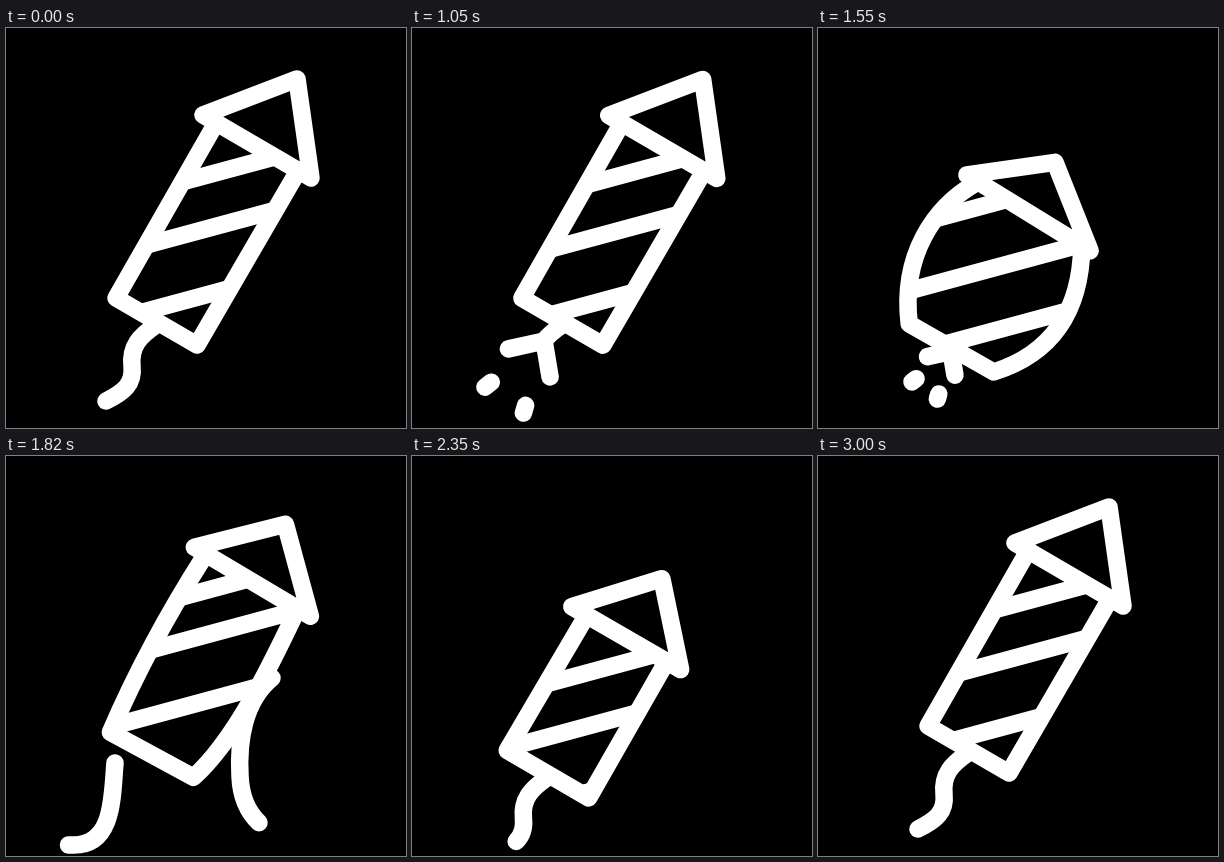
Write an HTML page that moves like this. It is 400 px wide and 400 px high and loops after 3020 ms.

```html
<!DOCTYPE html>
<html lang="en">
<head>
<meta charset="utf-8">
<title>Firework rocket</title>
<style>
  html, body { margin: 0; width: 100%; height: 100%; overflow: hidden; background: #000; }
  svg { display: block; width: 100vw; height: 100vh; }
  path { fill: none; stroke: #fff; stroke-width: 17.5; stroke-linecap: round; stroke-linejoin: round; }
  clipPath path { stroke: none; fill: #000; }
</style>
</head>
<body>
<svg viewBox="0 0 400 400">
  <defs><clipPath id="inside"><path id="hull"/></clipPath></defs>
  <path id="smokeL" pathLength="1" d="M109 307C106 340 108 389 68 389C30 390 5 365 12 335C20 300 75 300 85 335C90 360 78 368 64 368C30 370 33 338 55 338"/>
  <path id="smokeR" pathLength="1" d="M266 222C238 245 232 285 234 320C235 345 244 360 258 371C290 395 360 395 380 355C400 310 365 275 325 285C290 295 285 345 313 355C350 362 362 320 333 316"/>
  <path id="sparks"/>
  <g id="rocket">
    <path id="fuse" pathLength="1" d="M150 297C134 308 124 318 126 338C128 356 118 364 100 373"/>
    <g clip-path="url(#inside)"><path id="stripes"/></g>
    <path id="body"/>
    <path id="head"/>
  </g>
</svg>
<script>
const LOOP = 3020;
const $ = id => document.getElementById(id);
const clamp = x => Math.min(1, Math.max(0, x));
const span = (t, a, b) => clamp((t - a) / (b - a));
const inOut = (x, n) => x < .5 ? (2 * x) ** n / 2 : 1 - (2 - 2 * x) ** n / 2;
const mix = (a, b, k) => a.map((v, i) => v + (b[i] - v) * k);

// shape: nose triangle (3 points), then left top, left bottom, right bottom, right top.
// bend: control points of the left side (downward) and right side (upward).
function pose(shape, stripes, bend) {
  if (!bend) {
    const [lt, lb, rb, rt] = [6, 8, 10, 12].map(i => shape.slice(i, i + 2));
    bend = [...mix(lt, lb, 1 / 3), ...mix(lt, lb, 2 / 3), ...mix(rb, rt, 1 / 3), ...mix(rb, rt, 2 / 3)];
  }
  return { shape: [...shape, ...bend], stripes };
}
const blend = (p, q, k, ks = k) => ({
  shape: mix(p.shape, q.shape, k),
  stripes: mix(p.stripes, q.stripes, ks)
});

// Stripe values are heights at x = 200.
const rest = pose([197, 87, 291, 51, 305, 150, 210, 95, 110, 270, 191, 317, 292, 143], [147.5, 201, 267]);
const squat = pose([156, 138, 245, 122, 277, 212, 166, 146, 94, 292, 178, 340, 268, 207], [165, 228, 291.5],
  [125, 175, 92, 225, 235, 315, 262, 268]);
const launch = pose([188, 92, 279, 69, 304, 161, 198, 101, 104, 277, 187, 322, 290, 156], [135, 179.5, 245.5],
  [170, 145, 135, 205, 228, 285, 262, 215]);
const rise = pose([119, 220, 205, 201, 229, 283, 134, 233, 79, 321, 161, 369, 213, 275], [278.5, 332, 398]);

const TURN = 1975; // rocket is out of sight here and comes back from below

function rocketAt(t) {
  if (t < TURN) {
    const k = 1.174 * inOut(span(t, 1000, 1450), 3);
    const ks = 1.2 * inOut(span(t, 930, 1450), 2);
    const s = Math.max(0, t - 1820);
    const p = blend(blend(rest, squat, k, ks), launch, span(t, 1560, 1820) ** 3);
    return { p, lift: .8 * s + .018 * s * s };
  }
  const k = Math.min(1.3, (Math.max(0, 3000 - t) / 830) ** 3);
  return { p: blend(rest, rise, k), lift: -300 * (Math.max(0, 2150 - t) / 175) ** 2, k };
}

function trim(el, from, to) {
  const len = to - from;
  el.style.display = len > .002 ? '' : 'none';
  el.setAttribute('stroke-dasharray', `0 ${from} ${len} 2`);
}

function drawRocket(t, p, lift) {
  const [ax, ay, bx, by, cx, cy, ltx, lty, lbx, lby, rbx, rby, rtx, rty, ...bend] = p.shape;
  const side = `M${ltx} ${lty}C${bend.slice(0, 4)} ${lbx} ${lby}L${rbx} ${rby}C${bend.slice(4)} ${rtx} ${rty}`;
  $('head').setAttribute('d', `M${ax} ${ay}L${bx} ${by}L${cx} ${cy}Z`);
  $('body').setAttribute('d', side);
  $('hull').setAttribute('d', side + 'Z');
  $('stripes').setAttribute('d', p.stripes.map(y => `M0 ${y + 54}L400 ${y - 54}`).join(''));
  $('rocket').setAttribute('transform', `translate(${lift * .5} ${-lift * .866})`);
  const shift = [(lbx + rbx) / 2 - 150.5, (lby + rby) / 2 - 293.5];
  $('fuse').setAttribute('transform', `translate(${shift})`);
  return shift;
}

function drawSparks(t, x, y) {
  const size = span(t, 520, 700) * (1 - span(t, 1500, 1650));
  $('sparks').style.display = size > 0 ? '' : 'none';
  if (!size) return;
  const c = Math.cos((t - 1050) / 250 * Math.PI);
  const mid = 121 + 3 * c;
  const at = (deg, r) => {
    const a = deg * Math.PI / 180;
    return `${x + Math.cos(a) * r * size} ${y + Math.sin(a) * r * size}`;
  };
  let d = '';
  for (const s of [-1, 1]) {
    const ray = mid + s * (29 + 14.5 * c);
    const dot = mid + s * (28.5 - 10.5 * c);
    const r = 68 + 3 * c;
    d += `M${x} ${y}L${at(ray, 46.5 - 10 * c)}M${at(dot, r - 4)}L${at(dot, r + 4)}`;
  }
  $('sparks').setAttribute('d', d);
}

function drawSmoke(t) {
  const head = t < 1820 ? .27 * span(t, 1690, 1820) : 1 - .73 * (1 - span(t, 1820, 2170)) ** 1.6;
  const tail = t < 2170 ? .87 * inOut(span(t, 1820, 2170), 1.5) : .87 + .13 * span(t, 2170, 2290);
  trim($('smokeL'), tail, head);
  trim($('smokeR'), tail, head);
}

function draw(now) {
  const t = now % LOOP;
  const { p, lift, k } = rocketAt(t);
  const [dx, dy] = drawRocket(t, p, lift);
  const fuse = k === undefined ? 1 - span(t, 530, 1220) : Math.max(.3, 1 - .48 * k);
  trim($('fuse'), 0, fuse);
  const tip = $('fuse').getPointAtLength($('fuse').getTotalLength() * fuse);
  drawSparks(t, tip.x + dx, tip.y + dy);
  drawSmoke(t);
}

const start = performance.now();
function tick() {
  draw(performance.now() - start);
  requestAnimationFrame(tick);
}
tick();
</script>
</body>
</html>
```
